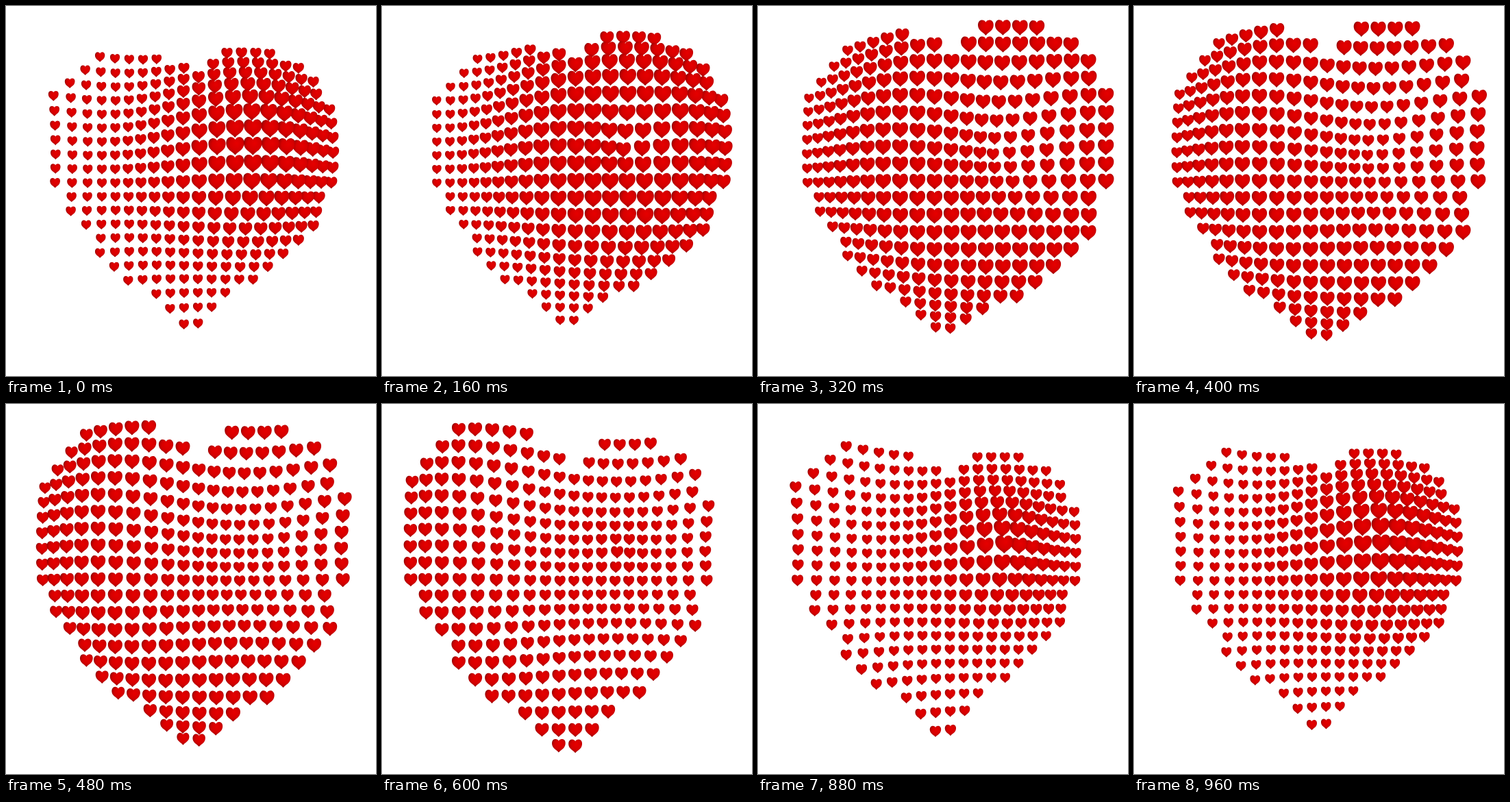
Animation, 540 px wide and 540 px high, one loop 1000 ms. Source, as an HTML page with a canvas:

```html
<!DOCTYPE html>
<html lang="en">
<head>
<meta charset="utf-8">
<title>Heart wave</title>
<style>
html, body { margin: 0; width: 100%; height: 100%; overflow: hidden; background: #fff; }
canvas { display: block; width: 540px; height: 540px; }
</style>
</head>
<body>
<canvas id="stage" width="540" height="540"></canvas>
<script>
const ctx = document.getElementById('stage').getContext('2d');
const LOOP = 1000, STEP = 40;
const MID = 270, GAP = 20, TOP = 80;
const SOURCE = { x: 340, y: 220 };
const WAVELENGTH = 372, LEAD = 0.043;

// Column spans [first, last] for each row of the big heart, top to bottom
const ROWS = [
  [3, 7, 12, 15], [2, 9, 11, 17], [1, 18], [0, 18],
  [0, 19], [0, 19], [0, 19], [0, 19], [0, 19], [0, 19],
  [1, 18], [1, 18], [2, 18], [3, 17], [3, 16],
  [4, 15], [5, 14], [7, 12], [8, 11], [9, 10]
];

const dots = [];
ROWS.forEach((spans, row) => {
  for (let i = 0; i < spans.length; i += 2) {
    for (let col = spans[i]; col <= spans[i + 1]; col++) {
      const x = TOP + col * GAP, y = TOP + row * GAP;
      dots.push({ x, y, d: Math.hypot(x - SOURCE.x, y - SOURCE.y) });
    }
  }
});

const heart = new Path2D(
  'M0 -.34 C.07 -.49 .28 -.53 .4 -.42 C.54 -.29 .52 -.03 .41 .13 ' +
  'C.31 .28 .12 .36 0 .51 C-.12 .36 -.31 .28 -.41 .13 ' +
  'C-.52 -.03 -.54 -.29 -.4 -.42 C-.28 -.53 -.07 -.49 0 -.34 Z');

const red = ctx.createRadialGradient(0.1, -0.14, 0, 0.04, -0.06, 0.58);
red.addColorStop(0, '#e60000');
red.addColorStop(0.6, '#d60000');
red.addColorStop(0.82, '#b80000');
red.addColorStop(1, '#820000');

// Height of the ripple as a share of the viewing distance
function lift(d, p) {
  const wave = (1 + Math.cos(2 * Math.PI * (p + LEAD - d / WAVELENGTH))) / 2;
  return (0.229 - 0.00021 * d) * wave;
}

function draw(ms) {
  const p = ms / LOOP;
  ctx.setTransform(1, 0, 0, 1, 0, 0);
  ctx.fillStyle = '#fff';
  ctx.fillRect(0, 0, 540, 540);
  ctx.fillStyle = red;
  for (const dot of dots) dot.z = lift(dot.d, p);
  const order = dots.slice().sort((a, b) => a.z - b.z);
  for (const { x, y, d, z } of order) {
    const s = 1 / (1 - z);
    const size = (16.5 - 0.011 * d) * Math.pow(s, 1.9);
    ctx.setTransform(size, 0, 0, size, MID + (x - MID) * s, MID - 1.5 + (y - MID) * s);
    ctx.fill(heart);
  }
}

const start = performance.now();
function tick() {
  const ms = (performance.now() - start) % LOOP;
  draw(Math.floor(ms / STEP) * STEP);
  requestAnimationFrame(tick);
}
tick();
</script>
</body>
</html>
```
